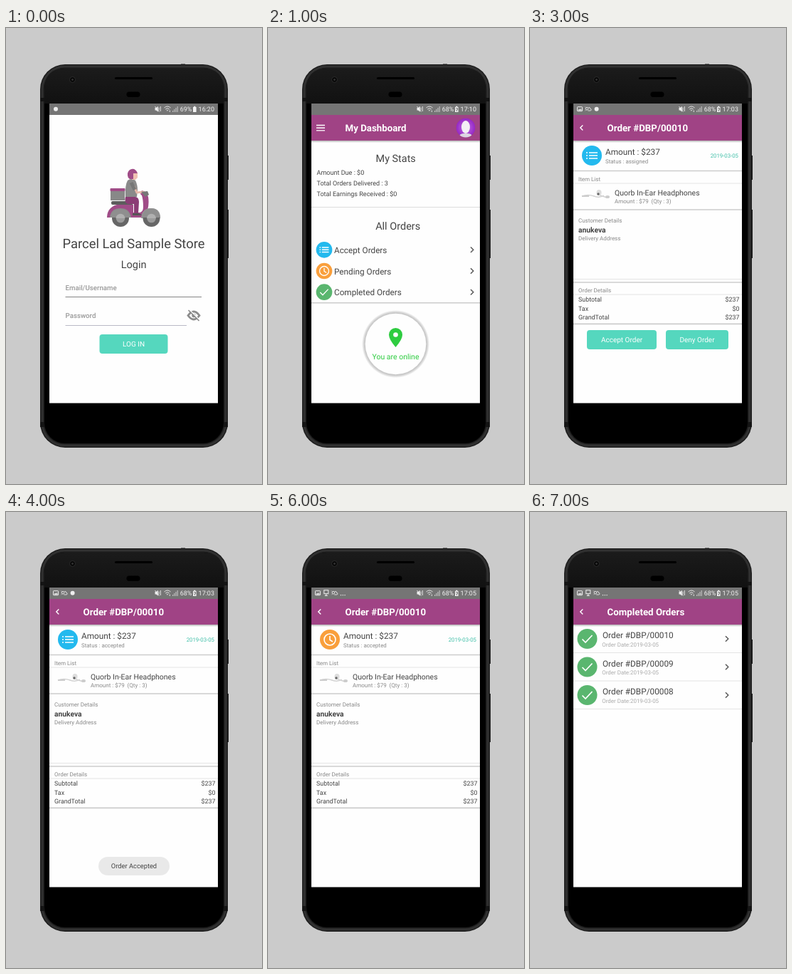
Animation of 360 by 640 pixels, one loop 8000 ms. Source, as an HTML page:

```html
<!DOCTYPE html>
<html lang="en">
<head>
<meta charset="utf-8">
<title>Courier app tour</title>
<style>
  html, body { margin: 0; width: 100%; height: 100%; overflow: hidden; background: #cbcbcb; }
  svg { display: block; width: 100%; height: 100%; }
  text { font-family: Roboto, sans-serif; text-rendering: geometricPrecision; white-space: pre; }
  .scene { visibility: hidden; animation: show 8s step-end infinite; }
  @keyframes show { 0% { visibility: visible; } 12.5%, 100% { visibility: hidden; } }
</style>
</head>
<body>
<svg viewBox="0 0 360 640">
  <defs>
    <linearGradient id="forehead" x2="0" y2="1">
      <stop offset="0" stop-color="#1b1b1b"/><stop offset="1" stop-color="#111"/>
    </linearGradient>
    <linearGradient id="barShade" x2="0" y2="1">
      <stop offset="0" stop-color="#000" stop-opacity=".3"/><stop offset="1" stop-color="#000" stop-opacity="0"/>
    </linearGradient>
    <radialGradient id="halo">
      <stop offset=".88" stop-color="#bbb"/><stop offset=".94" stop-color="#d4d4d4"/><stop offset="1" stop-color="#fff"/>
    </radialGradient>
    <radialGradient id="portrait">
      <stop offset=".3" stop-color="#b55bdc"/><stop offset="1" stop-color="#9426c4"/>
    </radialGradient>
    <clipPath id="round"><circle r="13.5"/></clipPath>

    <g id="list" fill="none" stroke="#fff" stroke-width="1.7">
      <circle r="14" fill="#23b9ee" stroke="none"/>
      <path d="M-4-4H8M-4 0H8M-4 4H8M-8-4h2M-8 0h2M-8 4h2"/>
    </g>
    <g id="clock" fill="none" stroke="#fff" stroke-width="1.6">
      <circle r="14" fill="#f99f3c" stroke="none"/>
      <circle r="8"/><path d="M0-5V.5L4 3"/>
    </g>
    <g id="check" fill="none" stroke="#fff" stroke-width="1.7">
      <circle r="14" fill="#5ab66f" stroke="none"/>
      <path d="M-7 .5L-2.5 5 7-5"/>
    </g>
    <path id="next" d="M-2-3.7L1.8 0-2 3.7" fill="none" stroke="#555" stroke-width="1.4"/>

    <g id="picture"><rect x="-3.5" y="-3" width="7" height="6" rx=".6" fill="none" stroke="#eee"/><path d="M-2.7 2L-1-.3.2 1 1.5-.8 2.8 2Z" fill="#eee"/></g>
    <g id="weather" fill="none" stroke="#eee" stroke-width=".9"><circle cx="-1.7" cy="-.5" r="1.8"/><path d="M-4.2-3l.8.8M-4.2 2.5l.8-.8M-.3 2.3H3a1.3 1.3 0 0 0 0-2.6 2 2 0 0 0-2.5-1.8"/></g>
    <g id="monitor" fill="none" stroke="#eee"><rect x="-3" y="-4" width="6" height="5"/><path d="M0 1v3M-2 3.7h4"/></g>
    <circle id="badge" r="3" fill="#eee"/>
    <path id="dots" d="M-3.5 3h1.2M-.7 3h1.2M2.1 3h1.2" stroke="#eee" stroke-width="1.2"/>

    <g id="signals" fill="none" stroke="#eee" stroke-width=".9">
      <path d="M209.5 112h1.8l2.4-2.3v8l-2.4-2.3h-1.8Z" fill="#eee" stroke="none"/>
      <path d="M209.5 110l6 7.5M215 111.5v4M217.3 110v7"/>
      <path d="M222.5 112q4.5-4 9 0M224.2 114q2.8-2.5 5.6 0M225.8 116q1.2-1 2.4 0M230.3 115.5v2.5"/>
      <path d="M234.6 118v-2M236.8 118v-4M239 118v-6M241.2 118v-8" stroke="#bdbdbd" stroke-width="1.2"/>
    </g>

    <g id="scooter">
      <path d="M142 266q0-14 14-18h23v11h9q5-1 5-8 0-10-2-16l-2-2 2-5q7 2 9 9 2 12-3 25-2 4-7 4Z" fill="#a04c87"/>
      <path d="M146 266q1-13 15-13 13 0 15 13Z" fill="#8b8b8b"/>
      <path d="M190 267q1-14 14-14 13 0 13 14Z" fill="#999"/>
      <circle cx="161" cy="267" r="12" fill="#666"/><circle cx="161" cy="267" r="6.3" fill="#9b9b9b"/>
      <circle cx="204.5" cy="267" r="12" fill="#666"/><circle cx="204.5" cy="267" r="6.3" fill="#9b9b9b"/>
      <path d="M147 266q1-12 14-12 12 0 14 12ZM191 266q2-13 13-13 12 0 13 13Z" fill="#8f8f8f"/>
      <path d="M154.7 267a6.3 6.3 0 0 1 12.600 0ZM198.200 267a6.300 6.300 0 0 1 12.600 0Z" fill="#b0b0b0"/>
      <rect x="148" y="243" width="31" height="5" rx="2" fill="#5d5d5d"/>
      <rect x="147" y="228" width="20" height="14" fill="#888"/><rect x="146.500" y="225" width="21" height="4" rx="1" fill="#a04c87"/>
      <path d="M168 237h14q5 1 5 7l-1 16h-6v-13h-9q-5-2-3-10Z" fill="#8b3d75"/>
      <path d="M178 260h8q4 1 5 3h-13Z" fill="#555"/>
      <path d="M171 214q5-4 11 0 3 6 3 14l-1 9h-16q-1-16 3-23Z" fill="#8a8a8a"/>
      <path d="M180 222l4 9 10-1" fill="none" stroke="#e8b9aa" stroke-width="3"/>
      <path d="M176 217l5 10" stroke="#777" stroke-width="5"/>
      <path d="M178 203h7v7l-3 3h-5Z" fill="#f0c0b2"/>
      <path d="M171 207a7 7.5 0 0 1 14-3h-6v8h-5q-3-2-3-5Z" fill="#a04c87"/>
      <path d="M190 230l9-1 2 5-5 3" fill="#777"/>
    </g>
  </defs>

  <rect width="360" height="640" fill="#cbcbcb"/>
  <g id="phone">
    <path d="M310 179h3v34h-3ZM310 255h3v68h-3ZM246 50.5h6v2h-6Z" fill="#161616"/>
    <rect x="48" y="51" width="264" height="538" rx="35" fill="#1c1c1c"/>
    <rect x="51" y="54" width="258" height="532" rx="32" fill="none" stroke="#303030" stroke-width="3"/>
    <path d="M48 98h6v5h-6ZM306 98h6v5h-6ZM48 553h6v7h-6ZM306 553h6v7h-6Z" fill="#141414"/>
    <rect x="54" y="57" width="252" height="526" rx="29" fill="#000"/>
    <path d="M54 106V86q0-29 29-29H277q29 0 29 29v20Z" fill="url(#forehead)"/>
    <circle cx="93.5" cy="72.5" r="4" fill="#080808" stroke="#2c2c2c"/><circle cx="93.5" cy="72.5" r="1.3" fill="#3a3a3a"/>
    <rect x="153" y="69" width="53" height="3" rx="1.5" fill="#000"/>
    <rect x="169.5" y="89.5" width="19" height="7.5" rx="3.7" fill="#000"/>
    <rect x="61" y="106" width="237" height="420.5" fill="#fefefe"/>
  </g>
  <g id="scenes"></g>
</svg>

<script>
const PURPLE = '#a04385', TEAL = '#55d7be', DARK = '#444', GREY = '#888';

const text = (x, y, size, value, fill = DARK, anchor = 'start', weight = 400) =>
  `<text x="${x}" y="${y}" font-size="${size}" fill="${fill}" text-anchor="${anchor}" font-weight="${weight}">${value}</text>`;
const icon = (id, x, y, scale = 1) =>
  `<use href="#${id}" transform="translate(${x} ${y}) scale(${scale})"/>`;
const line = (y, color = '#e4e4e4', width = 1, x1 = 61, x2 = 298) =>
  `<path d="M${x1} ${y}H${x2}" stroke="${color}" stroke-width="${width}"/>`;
const button = (x, y, width, label) =>
  `<rect x="${x}" y="${y}" width="${width}" height="27" rx="4" fill="${TEAL}"/>` +
  text(x + width / 2, y + 17.3, 10, label, '#fff', 'middle');

function statusBar(time, charge, icons, full) {
  const level = full ? '' : '<path d="M264 112.5h2.5v2.5h-2.5M265 116.5h1" stroke="#757575" fill="none"/>';
  return '<rect x="61" y="106" width="237" height="16" fill="#757575"/>' +
    icons.map((id, i) => icon(id, 70 + 11.8 * i, 113.7)).join('') +
    '<use href="#signals"/>' +
    text(244.7, 117.3, 9, charge + '%', '#f2f2f2') +
    '<path d="M263 111h1.2v-1.2h2.2v1.2h1.2v7H263Z" fill="#f2f2f2"/>' + level +
    text(293, 117.3, 9, time, '#f2f2f2', 'end');
}

function appBar(title, menu) {
  const mark = menu ? 'M68 136.5H80M68 140.2H80M68 143.9H80' : 'M74.3 136.5L70.8 140L74.3 143.5';
  return `<rect x="61" y="122" width="237" height="36" fill="${PURPLE}"/>
    <rect x="61" y="158" width="237" height="3" fill="url(#barShade)"/>
    <path d="${mark}" fill="none" stroke="#fff" stroke-width="1.4"/>` +
    text(108.5, 145, 13.3, title, '#fff', 'start', 700);
}

function login() {
  return statusBar('16:20', 69, ['badge'], true) +
    '<use href="#scooter"/>' +
    text(179.5, 309, 18.4, 'Parcel Lad Sample Store', DARK, 'middle') +
    text(179.7, 337, 14.6, 'Login', DARK, 'middle') +
    text(83.5, 367.7, 9.7, 'Email/Username', '#999', 'start', 500) + line(377.5, '#858585', 1, 83.5, 275) +
    text(83.5, 407.3, 9.7, 'Password', '#999', 'start', 500) + line(417.5, '#b9b9c6', 1, 83.5, 254) +
    `<g transform="translate(264 403.5)" fill="none" stroke="#8c8c8c">
      <path d="M-8 0Q0-11 8 0 0 11-8 0Z" stroke-width="2.8"/>
      <circle r="2.7" fill="#8c8c8c" stroke="none"/>
      <path d="M-6.5-8.5L8.5 6.5" stroke="#fff" stroke-width="1.5"/><path d="M-7.5-7.5L7.5 7.5" stroke-width="1.7"/>
    </g>` + button(131.5, 430, 96, 'LOG IN');
}

function dashboard() {
  const stats = ['Amount Due : $0', 'Total Orders Delivered : 3', 'Total Earnings Received : $0'];
  const groups = [['list', 'Accept'], ['clock', 'Pending'], ['check', 'Completed']];
  return statusBar('17:10', 68, []) + appBar('My Dashboard', true) +
    `<g transform="translate(278 140)" clip-path="url(#round)">
      <circle r="13.5" fill="url(#portrait)"/>
      <path d="M-10 14q1-6 7-6h6q6 0 7 6Z" fill="#ddd5e2"/><ellipse cy="-1" rx="6" ry="9" fill="#f3eff5"/>
    </g>` +
    text(179.7, 188, 14.4, 'My Stats', DARK, 'middle') +
    stats.map((s, i) => text(68.5, 206 + 15 * i, 9.05, s)).join('') + line(251.5, '#dcdcdc') +
    text(182.7, 283, 14.5, 'All Orders', DARK, 'middle') +
    groups.map(([id, name], i) => {
      const y = 311.3 + 29.7 * i;
      return icon(id, 79, y, .81) + text(93, y + 4.5, 11.75, name + ' Orders') + icon('next', 287, y);
    }).join('') + line(385.7, '#ccc', 1.5) +
    '<circle cx="179.5" cy="443.5" r="47.5" fill="url(#halo)"/><circle cx="179.5" cy="443.5" r="42.8" fill="#fefefe"/>' +
    '<path d="M179.5 448q-9.5-11-9.5-17.5a9.5 9.5 0 0 1 19 0q0 6.5-9.5 17.5Z" fill="#2ecc40"/><circle cx="179.5" cy="430.5" r="3.3" fill="#fff"/>' +
    text(179.5, 465, 10.5, 'You are online', '#2ecc40', 'middle');
}

const orderList = (title, id, numbers) => appBar(title) +
  numbers.map((number, i) => {
    const y = 178 + 39.5 * i;
    return icon(id, 80.5, y) + text(102, y - 1, 11.8, 'Order #DBP/' + number) +
      text(101.3, y + 10.5, 7.95, 'Order Date:2019-03-05', '#aaa') +
      icon('next', 277, y) + line(y + 19.5);
  }).join('');

function orderDetail(id, status) {
  const totals = [['Subtotal', '$237'], ['Tax', '$0'], ['GrandTotal', '$237']];
  return appBar('Order #DBP/00010') + icon(id, 87, 179) +
    text(106, 178, 11.8, 'Amount : $237') + text(106, 189.5, 7.9, 'Status : ' + status, GREY) +
    text(293, 182, 7.8, '2019-03-05', '#41bfa8', 'end') + line(200.5, '#ccc', 1.5) +
    text(68, 215, 8, 'Item List', GREY) + line(218) +
    `<path d="M73 236q9-3 17 0t14-1M96 234l12 4" stroke="#d2d2d2" stroke-width="1.5" fill="none"/>
     <path d="M73 236h10" stroke="#ccc" stroke-width="2"/>
     <ellipse cx="97" cy="231" rx="3.5" ry="4" fill="#ddd"/><circle cx="96" cy="233" r="1.7" fill="#666"/><ellipse cx="109" cy="237" rx="3" ry="2" fill="#ccc"/>` +
    text(119, 235, 10.5, 'Quorb In-Ear Headphones') +
    text(119, 246, 8, 'Amount : $79  (Qty : 3)', GREY) + line(255, '#ccc', 1.7) +
    text(68, 273, 8, 'Customer Details', GREY) +
    text(68, 286.7, 10.3, 'anukeva', DARK, 'start', 700) +
    text(68, 298, 8, 'Delivery Address', GREY) + line(352.5) + line(357, '#ccc', 1.7) +
    text(68, 371, 8, 'Order Details', GREY) + line(374) +
    totals.map(([name, sum], i) => {
      const y = 384 + 12.5 * i;
      return text(68, y, 8.9, name) + text(294.5, y, 8.9, sum, DARK, 'end');
    }).join('') + line(415.3, '#ccc', 1.7);
}

const toast = message =>
  '<rect x="130" y="484" width="100" height="26" rx="13" fill="#e9e9e9"/>' +
  text(180, 500.3, 9.3, message, DARK, 'middle');

const detailStatus = statusBar('17:03', 68, ['picture', 'weather', 'badge']);
const finalStatus = statusBar('17:05', 68, ['picture', 'monitor', 'weather', 'dots']);

const scenes = [
  login(),
  dashboard(),
  statusBar('17:02', 68, ['weather', 'badge']) + orderList('Accept Orders', 'list', ['00010']),
  detailStatus + orderDetail('list', 'assigned') + button(80, 424, 98, 'Accept Order') + button(191, 424, 88, 'Deny Order'),
  detailStatus + orderDetail('list', 'accepted') + toast('Order Accepted'),
  statusBar('17:04', 68, ['monitor', 'picture', 'weather', 'dots']) + orderList('Pending Orders', 'clock', ['00010']),
  finalStatus + orderDetail('clock', 'accepted'),
  finalStatus + orderList('Completed Orders', 'check', ['00010', '00009', '00008']),
];

document.getElementById('scenes').innerHTML = scenes
  .map((content, i) => `<g class="scene" style="animation-delay:${i ? i - scenes.length : 0}s">${content}</g>`)
  .join('');
</script>
</body>
</html>
```
